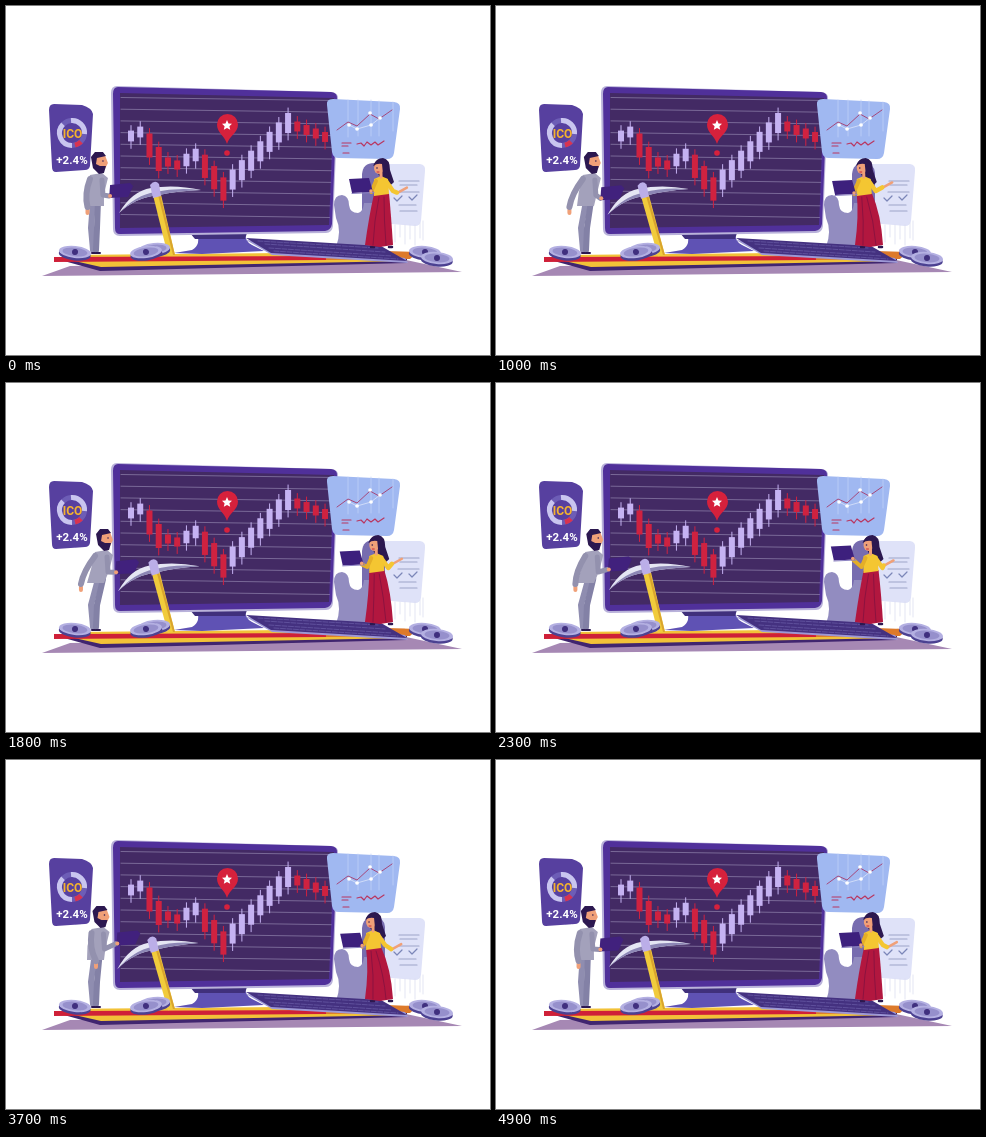
Recreate the animation shown at these times as an HTML page. Size 484 by 349 pixels, loop 5 s.

```html
<!DOCTYPE html>
<html lang="en">
<head>
<meta charset="utf-8">
<style>
  html, body { margin: 0; width: 100%; height: 100%; overflow: hidden; background: #fff; }
  svg { display: block; width: 100vw; height: 100vh; }
  text { font-family: Roboto, "Open Sans", sans-serif; font-weight: 700; font-stretch: condensed; text-anchor: middle; }
</style>
</head>
<body>
<svg viewBox="0 0 484 349" fill="none" stroke-linecap="round" stroke-linejoin="round">
  <!-- floor -->
  <path fill="#a688b4" d="M36 270L64 260 400 254 456 266Z"/>
  <path fill="#40256f" d="M58 255L94 265 401 257V252Z"/>
  <path fill="#f2c238" d="M64 254L95 261 401 255 388 246 60 249Z"/>
  <path fill="#dd7a2b" d="M320 250L380 245 412 246 404 253 320 254Z"/>
  <path fill="#cf2038" d="M48 251L320 250V254L48 256Z"/>

  <!-- monitor -->
  <path fill="#5f52b4" d="M190 226H239Q239 236 246 239L258 245 196 248 168 247 186 244Q196 238 190 226Z"/>
  <path fill="#40307c" d="M184 227H241L239 233H189Z"/>
  <path fill="#b9b2da" d="M111 80L326 86Q333 87 332 94L327 220Q326 227 320 227L114 230Q107 230 107 223L105 87Q105 80 111 80Z"/>
  <path fill="#50309a" d="M112 81L325 86Q332 87 331 93L326 218Q325 224 319 225L114 228Q109 228 109 222L107 88Q107 81 112 81Z"/>
  <path fill="#432a64" d="M114 87L328 92 323 219 114 222Z"/>
  <g id="grid" stroke="#9184ae" stroke-width=".7"></g>
  <g id="candles"></g>
  <path fill="#d6213c" d="M221 138C219 130 211 127 211 118.500A10.500 10.500 0 0 1 232 118.500C232 127 223 130 221 138Z"/>
  <path fill="#fff" d="M221 114L222.500 117.500 226 117.800 223.400 120.200 224.200 123.800 221 121.900 217.800 123.800 218.600 120.200 216 117.800 219.500 117.500Z"/>
  <circle cx="221" cy="147" r="2.800" fill="#d6213c"/>

  <!-- percentage card -->
  <path fill="#57409f" d="M48 98L76 99Q86 102 87 108L84 160Q83 164 79 164L50 166Q46 166 46 161L43 104Q43 98 48 98Z"/>
  <g stroke-width="5" stroke-linecap="butt">
    <circle cx="66" cy="127" r="12.500" stroke="#6d5db6"/>
    <path stroke="#c9c5ef" d="M66 139.500A12.500 12.500 0 0 1 57 118.300M65 114.500A12.500 12.500 0 0 1 78.500 128"/>
    <path stroke="#d83350" d="M75 135.800A12.500 12.500 0 0 1 69 139.100"/>
  </g>
  <text x="66.500" y="132" font-size="12" fill="#f5b32e">ICO</text>
  <text x="66" y="158" font-size="11.500" fill="#fff">+2.4%</text>

  <!-- line chart card -->
  <path fill="#a0b8f1" d="M327 93L388 96Q395 97 394 103L388 147Q387 153 381 153L333 152Q327 152 326 146L321 99Q320 93 327 93Z"/>
  <path stroke="#c3d3f8" stroke-width=".7" d="M342 94V131M352 94V130M365 94V130M373 95V130M387 96V125"/>
  <path stroke="#a63b6c" stroke-width=".9" d="M331 124L342 116 351 120 364 108 373 113 386 104"/>
  <path stroke="#fff" stroke-width=".5" d="M343 119L351 123 365 119 374 112"/>
  <path stroke="#fff" stroke-width="3.600" d="M343 119h.1M351 123h.1M365 119h.1M374 112h.1M364 107h.1"/>
  <path stroke="#b93660" stroke-width="1.200" d="M336 137h9M336 140h6M337 147h6M351 138l4-1 3 3 3-4 4 3 4-3 3 3 6-4"/>

  <!-- paper and armchair -->
  <path fill="#dfe2f8" d="M373 158L414 158Q420 159 419 165L415 215Q414 220 409 220L374 217Z"/>
  <path stroke="#9ea3c8" stroke-width="1.200" d="M393 175h20M394 179h17M392 186h21M393 199h17M394 205h17"/>
  <path stroke="#7c86b8" stroke-width="1.200" d="M388 192l3 3 5-5M403 191l3 3 5-5"/>
  <path stroke="#dcdff0" stroke-width=".8" d="M389 219V236M394 219V231M399 219V238M404 219V233M409 219V239M414 217V232M417 215V234"/>
  <path fill="#776caf" d="M356 193V168Q357 157 368 157 378 157 379 167V218H356Z"/>
  <path fill="#928cc0" d="M328 199Q328 189 336 189 343 190 343 199 344 207 352 207 357 206 358 197H366V241H330Q336 225 330 212Z"/>

  <!-- keyboard -->
  <path fill="#9d98d6" d="M240 234L266 249 402 257 399 252Z"/>
  <path fill="#443180" d="M240 232L375 240 401 255 265 247Z"/>
  <path stroke="#6659a4" stroke-width=".8" stroke-dasharray="5 1.500" d="M252 235L372 242M259 238L379 246M263 242L386 250M268 245L392 253"/>

  <g id="cast"></g>
  <g id="coins"></g>
</svg>
<script>
const el = id => document.getElementById(id);
const range = n => [...Array(n).keys()];
const poly = (fill, pts) => `<path fill="${fill}" d="M${pts.join(' ')}Z"/>`;
const limb = (color, width, d) => `<path stroke="${color}" stroke-width="${width}" d="${d}"/>`;
const dot = (x, y, r, fill) => `<circle cx="${x}" cy="${y}" r="${r}" fill="${fill}"/>`;

el('grid').innerHTML = range(11).map(i => {
  const y = 91.5 + i * 11.7;
  return `<path d="M115 ${y}L${328 - i * .45} ${y + 3}"/>`;
}).join('');

// the price runs straight between turning points; steeper runs give longer candles
const turns = [[0, 130], [1, 126], [3, 153], [5, 159], [7, 149], [10, 183], [17, 117], [21, 131]];
el('candles').innerHTML = range(22).map(i => {
  const k = Math.max(1, turns.findIndex(([at]) => at >= i));
  const [i0, y0] = turns[k - 1], [i1, y1] = turns[k];
  const slope = (y1 - y0) / (i1 - i0), y = y0 + slope * (i - i0);
  const half = Math.min(12, 2 + Math.abs(slope) * .85);
  const x = 125 + i * 9.24, color = slope > 0 ? '#cf2240' : '#c5b2f2';
  return limb(color, 1, `M${x} ${y - half - 5}V${y + half + 7}`)
    + `<rect x="${x - 3}" y="${y - half}" width="6" height="${half * 2}" fill="${color}"/>`;
}).join('');

const coin = (x, y, tilt) => `<g transform="translate(${x} ${y}) rotate(${tilt})">
  <ellipse cy="2.500" rx="16" ry="6" fill="#4c4191"/><ellipse rx="16" ry="6" fill="#b4b0e2"/>
  <ellipse rx="12.500" ry="4.300" fill="#9690cc"/><circle r="3" fill="#40307f"/></g>`;
el('coins').innerHTML = coin(69, 246, 6) + coin(148, 243, -6) + coin(140, 246, -8)
  + coin(419, 246, 5) + coin(431, 252, 5);

const LOOP = 5000;
const skin = '#f0a078', coat = '#a3a1bb', sleeve = '#9391ae', dark = '#2c1850';

// wave(size, lag, n): a cosine with n turns per loop, lag in degrees
const waveAt = t => (size, lag = 0, n = 1) =>
  size * Math.cos(n * t / LOOP * 2 * Math.PI - lag * Math.PI / 180);

function man(wave) {
  const x = 95.5 + wave(2.8, 155);
  const palm = 81.5 + wave(8.5, 270);
  const px = 108.8 + wave(5.2, 205), py = 176.7 + wave(4.7, 60);
  return limb('#8f8db0', 6, `M${x - 6} 196L85 222 87 244`) + limb('#8381a6', 6, `M${x - 1} 196L91 222 90 244`)
    + limb(dark, 2, 'M86 247H89M90 247H94')
    + limb(skin, 4, `M${palm} 204V207`)
    + poly(coat, [x - 9, 169, x + 3, 167, x + 9, 172, x + 5, 188, 98, 200, 81, 200, x - 13, 186])
    + limb(sleeve, 6, `M${x - 9} 173Q${(x + palm) / 2 - 9} 188 ${palm} 201`)
    + limb(sleeve, 5, `M${x + 3} 174L${x + 4} 189 ${px - 1} ${py + 11}`)
    + poly('#41217d', [px, py, px + 20, py - 2, px + 23, py + 1, px + 18, py + 12, px - 1, py + 13])
    + dot(px, py + 11, 2, skin)
    + poly(skin, [x - 5, 149, x + 6, 149, x + 9, 157, x + 6, 163, x - 4, 162])
    + poly(dark, [x - 8, 151, x - 4, 146, x + 4, 146, x + 7, 150, x - 2, 152, x - 3, 158, x + 1, 160, x + 7, 160, x + 5, 167, x, 168, x - 6, 162])
    + dot(x + 4, 155, .8, dark);
}

function woman(wave) {
  const x = 371 + wave(4, 0, 2);
  const bx = 336.7 + wave(4) + wave(2.3, 0, 2), by = 171 + wave(5) - wave(3, 0, 2);
  const hx = 397.3 + wave(1.6) + wave(2, 0, 2), hy = 183 + wave(4.5, 290);
  return `<path fill="${dark}" d="M${x - 7} 159Q${x - 5} 152 ${x + 2} 152 ${x + 9} 153 ${x + 9} 164L${x + 13} 176Q${x + 8} 182 ${x + 2} 178Z"/>`
    + limb(dark, 2.5, 'M365 241H368M383 241H386')
    + `<path fill="#b2173f" d="M${x - 7} 188L${x + 8} 187Q385 208 387 239L374 241 359 239Q363 210 ${x - 7} 188Z"/>`
    + limb('#8c1240', 1, `M${x - 2} 191Q368 215 367 239M${x + 3} 191Q378 215 380 239`)
    + limb(skin, 2.5, `M${hx - 9} ${hy + 2}L${hx} ${hy - 3}`)
    + poly('#f4c632', [x - 7, 173, x, 170, x + 7, 173, x + 8, 188, x - 7, 190])
    + limb('#f4c632', 4.5, `M${x + 5} 175L${x + 12} 185 ${hx - 10} ${hy + 2}`)
    + limb('#e4ae28', 4, `M${x - 5} 175L${x - 9} 184 ${bx + 22} ${by + 13}`)
    + poly('#3d207d', [bx, by, bx + 20, by - 1, bx + 24, by + 13, bx + 3, by + 14])
    + limb('#8c82c2', 1, `M${bx + 3} ${by + 14.5}L${bx + 25} ${by + 13.5}`)
    + dot(bx + 22, by + 12, 1.8, skin)
    + limb(skin, 3, `M${x} 167V171`)
    + `<ellipse cx="${x - 2}" cy="162" rx="5" ry="6" fill="${skin}"/>`
    + `<path fill="${dark}" d="M${x - 8} 160Q${x - 5} 152 ${x + 2} 153 ${x + 8} 155 ${x + 7} 172L${x + 2} 168 ${x + 1} 158Q${x - 4} 157 ${x - 8} 160Z"/>`
    + dot(x - 4, 162, .8, dark) + limb('#c52b3b', 1, `M${x - 4} 166h2`);
}

function pick(wave) {
  return `<g transform="rotate(${wave(1.1, 0, 2) - 1.1} 166 250)">`
    + poly('#f1cb3c', [145, 181, 153, 180, 169, 249, 162, 250])
    + poly('#d9a42e', [151, 185, 153, 184, 169, 249, 167, 249])
    + '<path fill="#e5e6f3" d="M113 207Q126 185 145 182 169 178 195 184 170 185 153 189 130 191 113 207Z"/>'
    + '<path fill="#8c86b5" d="M113 207Q130 189 149 186 171 181 195 184 170 185 153 189 130 191 113 207Z"/>'
    + '<path fill="#bbaee8" d="M144 179Q149 173 153 178L155 190 147 192Z"/></g>';
}

const start = performance.now();
function tick() {
  const now = performance.now() - start;
  const wave = waveAt(Math.floor(now % LOOP / 100) * 100);
  el('cast').innerHTML = man(wave) + pick(wave) + woman(wave);
  requestAnimationFrame(tick);
}
tick();
</script>
</body>
</html>
```
